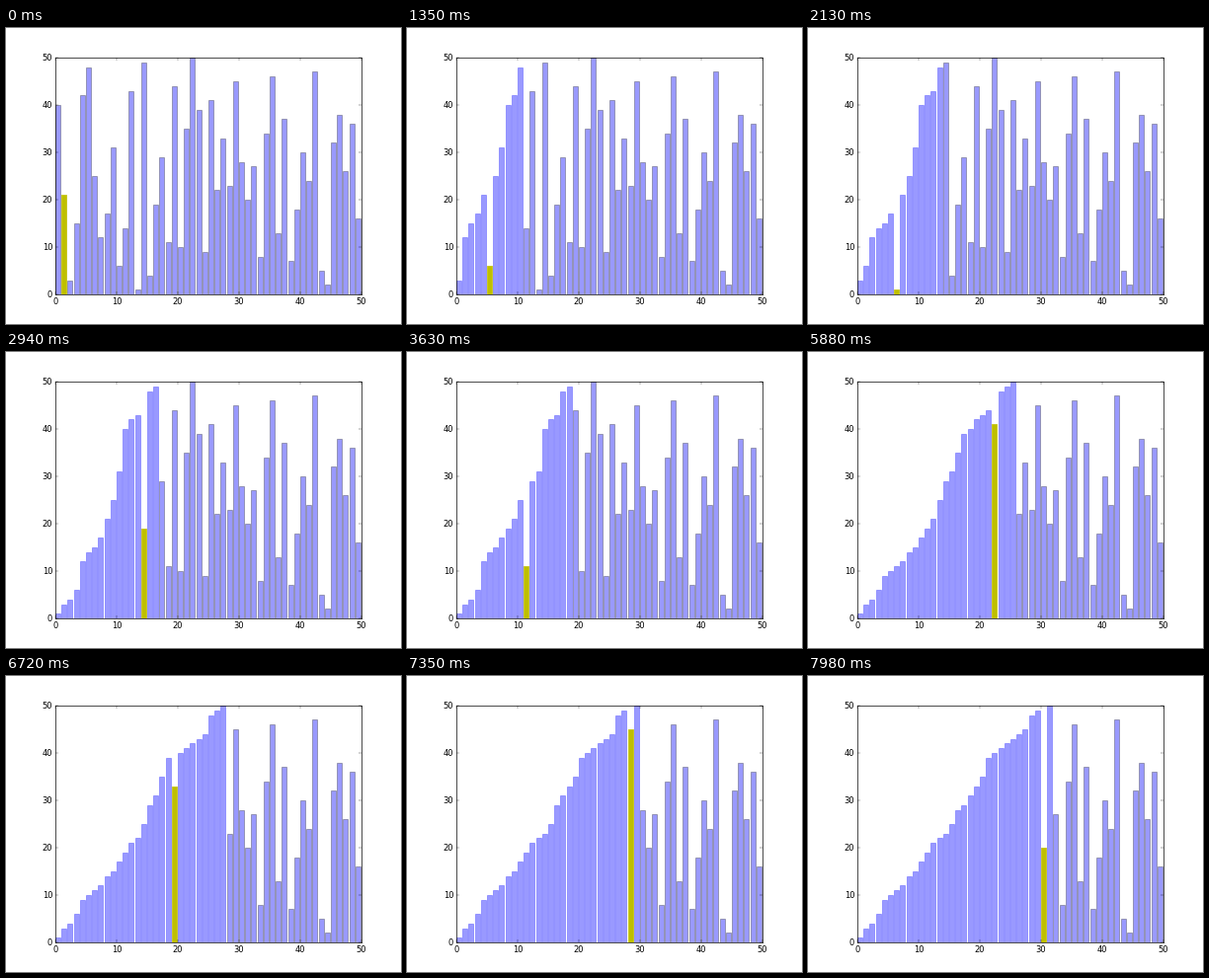
Recreate the animation shown at these times as a matplotlib script. Size 400 px wide and 300 px high, loop 8 s.

```python
import matplotlib.pyplot as plt
import numpy as np
from matplotlib import markers
from matplotlib.animation import FuncAnimation
from matplotlib.collections import PolyCollection

plt.rcParams.update({"font.family": "DejaVu Sans", "font.size": 12})

# The shuffled input of the sort
START = [40, 21, 3, 15, 42, 48, 25, 12, 17, 31, 6, 14, 43, 1, 49, 4, 19,
         29, 11, 44, 10, 35, 50, 39, 9, 41, 22, 33, 23, 45, 28, 20, 27, 8,
         34, 46, 13, 37, 7, 18, 30, 24, 47, 5, 2, 32, 38, 26, 36, 16]
N = len(START)
TICK_MS, STEP_MS, LOOP_MS = 10, 30, 8000
STEPS = -(-LOOP_MS // STEP_MS)

BLUE = ("blue", 0.4)
BLACK = ("black", 0.4)
YELLOW = "y"


def insertion_sort(values):
    """Yield (values, marked index, count of bars already visited)."""
    a = list(values)
    for i in range(1, N):
        j = i
        yield a[:], j, i + 1 if i > 1 else 0
        while j > 0 and a[j - 1] > a[j]:
            a[j - 1], a[j] = a[j], a[j - 1]
            j -= 1
            yield a[:], j, i + 1
        yield a[:], None, i + 1


states = [s for s, _ in zip(insertion_sort(START), range(STEPS))]

fig = plt.figure(figsize=(8, 6), dpi=50, facecolor="white")
ax = fig.add_axes([0.125, 0.1, 0.775, 0.8])
for spine in ax.spines.values():
    spine.set_linewidth(1)

bars = PolyCollection([], linewidths=1, zorder=1)
ax.add_collection(bars, autolim=False)


def ticks(x, y, marker):
    ax.plot(x, y, ls="none", marker=marker, ms=4, mew=0.5,
            color="black", clip_on=False)


def label(v, at, offset, ha, va):
    ax.annotate(str(v), at, xytext=offset, textcoords="offset points",
                ha=ha, va=va)


# Inward ticks on all four sides, labels at the left and bottom
marks = np.arange(0, N + 1, 10)
low, high = 0 * marks, 0 * marks + N
ticks(marks, low, markers.TICKUP)
ticks(marks, high, markers.TICKDOWN)
ticks(low, marks, markers.TICKRIGHT)
ticks(high, marks, markers.TICKLEFT)
for v in marks:
    label(v, (v, 0), (0, -4), "center", "top")
    label(v, (0, v), (-4, -1), "right", "center")
ax.set(xlim=(0, N), ylim=(0, N), xticks=[], yticks=[])


def bar(x, h):
    return [(x, 0), (x + 0.8, 0), (x + 0.8, h), (x, h)]


def update(tick):
    values, marked, visited = states[tick * TICK_MS // STEP_MS]
    faces = [BLUE] * N
    edges = [BLUE if i < visited else BLACK for i in range(N)]
    if marked is not None:
        faces[marked] = edges[marked] = YELLOW
    bars.set_verts([bar(i, h) for i, h in enumerate(values)])
    bars.set_facecolor(faces)
    bars.set_edgecolor(edges)
    return [bars]


anim = FuncAnimation(fig, update, frames=LOOP_MS // TICK_MS,
                     interval=TICK_MS, repeat=True, repeat_delay=0)
plt.show()
```
